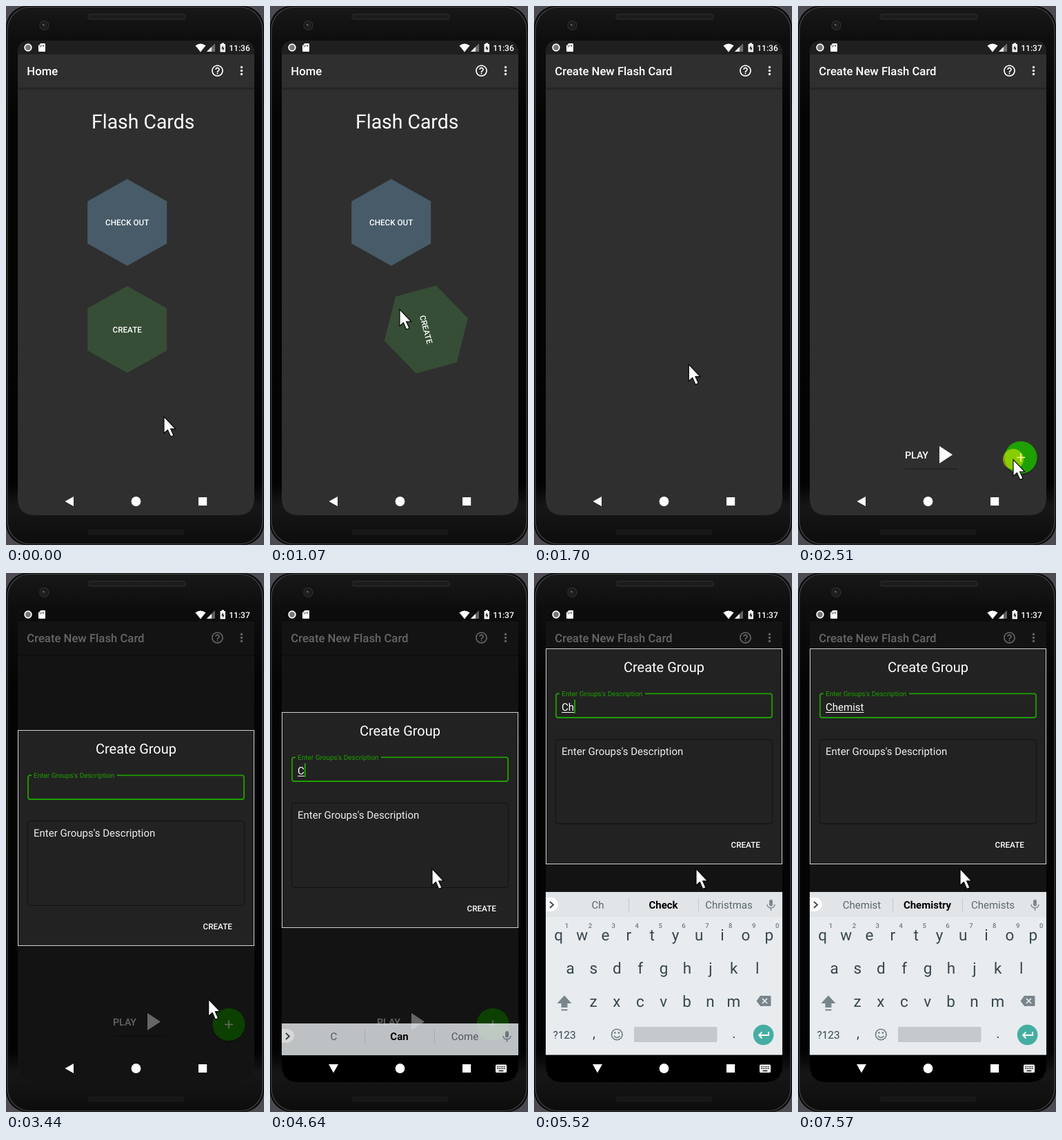
Recreate the animation shown at these times as an HTML page. Size 374x779 px, loop 8 s.

```html
<!DOCTYPE html>
<html lang="en">
<head>
<meta charset="utf-8">
<title>Flash Cards</title>
<style>
html, body { margin: 0; width: 100%; height: 100%; overflow: hidden; background: #000; }
svg { display: block; width: 100vw; height: 100vh; font-family: Roboto, sans-serif; text-rendering: geometricPrecision; }
.mid { text-anchor: middle; }
.med { font-weight: 500; }
</style>
</head>
<body>
<svg viewBox="0 0 374 779">
  <defs>
    <linearGradient id="body" x1="0" y1="0" x2="0" y2="1">
      <stop offset="0" stop-color="#181818"/><stop offset=".06" stop-color="#0e0e0e"/>
      <stop offset=".2" stop-color="#040404"/><stop offset=".89" stop-color="#030303"/>
      <stop offset=".93" stop-color="#161616"/><stop offset="1" stop-color="#0d0d0d"/>
    </linearGradient>
    <linearGradient id="shade" x1="0" y1="0" x2="0" y2="1">
      <stop offset="0" stop-opacity=".3"/><stop offset="1" stop-opacity="0"/>
    </linearGradient>
    <pattern id="mesh" width="3" height="3" patternUnits="userSpaceOnUse">
      <path d="M0 3L3 0" stroke="#2c2c2c" stroke-width=".8"/>
    </pattern>
    <clipPath id="screen"><path d="M17 68Q17 50 35 50H342Q360 50 360 68V711Q360 736 335 736H42Q17 736 17 711Z"/></clipPath>
  </defs>

  <g id="phone">
    <rect width="374" height="779" fill="#4d4a52"/>
    <rect x="0" y="0" width="374" height="779" rx="31" fill="#0a0a0a"/>
    <rect x="2" y="1.500" width="370" height="776" rx="33" fill="url(#body)" stroke="#48484a" stroke-width="1.200"/>
    <rect x="119" y="12" width="141" height="7" rx="2.500" fill="#161616" stroke="#343434"/>
    <rect x="120" y="13" width="139" height="5" fill="url(#mesh)"/>
    <rect x="119" y="757.500" width="139" height="5.500" rx="2.500" fill="#121212" stroke="#202020"/>
    <rect x="120" y="758" width="137" height="4.500" fill="url(#mesh)" opacity=".6"/>
    <circle cx="55.500" cy="28" r="6.500" fill="#1a1a1a" stroke="#2b2b2b" stroke-width="1.500"/>
    <circle cx="55.500" cy="28" r="2.800" fill="#2a2a2a"/>
    <circle cx="54" cy="27" r="1" fill="#777"/>
  </g>

  <g clip-path="url(#screen)">
    <rect x="17" y="50" width="343" height="686" fill="#2f2f2f"/>
    <rect x="17" y="50" width="343" height="20" fill="#1f1f1f"/>
    <rect x="17" y="118" width="343" height="4" fill="url(#shade)"/>
    <text id="title" class="med" x="30.300" y="99.700" font-size="16.700" fill="#fff"></text>
    <path transform="translate(296.500 83.500) scale(.8345)" fill="#fff" d="M11 18h2v-2h-2v2zm1-16C6.480 2 2 6.480 2 12s4.480 10 10 10 10-4.480 10-10S17.520 2 12 2zm0 18c-4.410 0-8-3.590-8-8s3.590-8 8-8 8 3.590 8 8-3.590 8-8 8zm0-14c-2.210 0-4 1.790-4 4h2c0-1.100.9-2 2-2s2 .9 2 2c0 2-3 1.750-3 5h2c0-2.250 3-2.500 3-5 0-2.210-1.790-4-4-4z"/>
    <g fill="#fff"><circle cx="341.500" cy="88.500" r="1.700"/><circle cx="341.500" cy="93.500" r="1.700"/><circle cx="341.500" cy="98.500" r="1.700"/></g>

    <g id="home" fill="#fff" class="mid">
      <text x="198.700" y="177" font-size="28.400">Flash Cards</text>
      <g transform="translate(175.700 312.700)">
        <path class="hex" fill="#475b69"/>
        <text class="med" y="4.300" font-size="11.700">CHECK OUT</text>
      </g>
      <g id="roller">
        <path class="hex" fill="#364e35"/>
        <text class="med" y="4.300" font-size="11.700">CREATE</text>
      </g>
    </g>

    <g id="editor" fill="#fff">
      <rect x="155" y="668" width="77" height="3" fill="url(#shade)"/>
      <text class="med" x="155" y="654" font-size="14.200">PLAY</text>
      <path d="M205 636V661L224 648.500Z"/>
      <circle cx="323" cy="654.500" r="24" fill="#000" opacity=".2"/>
      <circle id="fab" cx="323" cy="652.500" r="23.600"/>
      <path d="M317 652.500h12M323 646.500v12" stroke="#fff" stroke-width="1.700"/>
    </g>

    <rect id="dim" x="17" y="50" width="343" height="686"/>

    <g id="dialog" fill="#fff">
      <rect x="17.500" y="227.500" width="342" height="311" fill="#222" stroke="#d0d0d0"/>
      <text class="mid" x="188.500" y="261" font-size="20">Create Group</text>
      <path d="M37 292.300H35Q32 292.300 32 295.300V324Q32 327 35 327H342Q345 327 345 324V295.300Q345 292.300 342 292.300H161" fill="none" stroke="#1ea000" stroke-width="1.800"/>
      <text x="40" y="296.300" font-size="10" fill="#1ea000">Enter Groups's Description</text>
      <text id="typed" x="40" y="317" font-size="15.020"></text>
      <rect id="line" x="40" y="319" height="1"/>
      <rect id="caret" y="301" width="2" height="20" fill="#1ea000"/>
      <rect x="31.500" y="358.500" width="314" height="122" rx="4" fill="none" stroke="#111"/>
      <text x="40" y="381" font-size="15.020" fill="#eee">Enter Groups's Description</text>
      <text class="mid med" x="306.700" y="515.300" font-size="11.700">CREATE</text>
    </g>

    <rect id="navbg" x="17" y="697" width="343" height="39"/>
    <g id="keyboard">
      <rect x="17" y="461" width="343" height="235.500" fill="#e8ecef"/>
      <g id="keys"></g>
    </g>
    <g id="strip">
      <rect id="bar" x="17" y="461" width="343" fill="#e1e5e8"/>
      <path d="M17 469H25A10 10 0 0 1 25 489H17Z" fill="#fff"/>
      <path d="M23 475L28 479.500L23 484" fill="none" stroke="#37474f" stroke-width="1.800"/>
      <path d="M137.500 470V490M238.500 470V490" stroke="#c3c9cc"/>
      <g class="mid" font-size="15" fill="#5b676d">
        <text class="tip" x="92.500" y="485"></text>
        <text class="tip" x="187.500" y="485" font-weight="700" fill="#000"></text>
        <text class="tip" x="282.500" y="485"></text>
      </g>
      <rect x="341" y="472" width="5" height="9.500" rx="2.500" fill="#7b888e"/>
      <path d="M338 479Q338.500 484 343.500 484T349 479M343.500 484V488" fill="none" stroke="#7b888e" stroke-width="1.500"/>
    </g>

    <g id="status" fill="#fff">
      <circle cx="32" cy="60" r="4.800" fill="#777" stroke="#fff" stroke-width="1.800"/>
      <path d="M50.500 54H56Q57 54 57 55V65Q57 66 56 66H48Q47 66 47 65V57.500Z"/>
      <path d="M49.500 57v2.500M52 56v3M54.500 56v3" stroke="#444"/>
      <path d="M274.500 57.300Q282 51.500 289.500 57.300L282 66.500Z"/>
      <path d="M303 54V66H291Z" opacity=".35"/><path d="M298 59V66H291Z"/>
      <path d="M312.500 53.500h3.500v1.500h2V66.500h-7.500V55h2Z"/>
      <path d="M314.800 57L312 61.500H314V65L316.700 60.500H314.800Z" fill="#222"/>
      <text id="clock" class="med" x="323.300" y="64.600" font-size="12"></text>
    </g>
    <g fill="#fff">
      <path id="back"/>
      <circle cx="188.500" cy="716" r="6.900"/>
      <rect x="279" y="710" width="12.200" height="12"/>
      <g id="imeIcon">
        <rect x="327" y="710.500" width="16" height="11.500" rx="1.500"/>
        <path d="M329 713.500H341M329 716.300H341" stroke="#000" stroke-width="1.500" stroke-dasharray="1.500 1.100"/>
        <path d="M331.500 719.500H338.500" stroke="#000" stroke-width="1.500"/>
      </g>
    </g>
  </g>

  <circle id="click" r="15" fill="#ff0" opacity=".47"/>
  <path id="cursor" d="M0 .5V24.500L5.400 19.600L9.800 29.500L14 27.700L9.600 18H16.700Z" fill="#fff" stroke="#000" stroke-width="1.100"/>
</svg>
<script>
const $ = id => document.getElementById(id);
const LOOP = 8000;
const clamp = v => Math.max(0, Math.min(1, v));
const span = (t, start, dur) => clamp((t - start) / dur);
const smooth = u => u * u * (3 - 2 * u);
const easeOut = u => 1 - (1 - u) * (1 - u);
const within = (t, a, b) => t >= a && t < b;
const show = (id, on) => $(id).setAttribute('display', on ? 'inline' : 'none');
const attr = (id, name, value) => $(id).setAttribute(name, value);

// Typed text with its three suggestions
const typing = [
  [4540, 'C', 'C', 'Can', 'Come'],
  [4970, 'Ch', 'Ch', 'Check', 'Christmas'],
  [5100, 'Chm', 'Chm', 'Chem', 'CGM'],
  [5520, 'Ch', 'Ch', 'Check', 'Christmas'],
  [5770, 'Che', 'Che', 'Check', 'Cheese'],
  [5870, 'Chem', 'Chem', 'Chemical', 'Check'],
  [6580, 'Chemi', 'Chemi', 'Chemical', 'Check'],
  [6780, 'Chemis', 'Chemis', 'Chemistry', 'Chemist'],
  [7110, 'Chemist', 'Chemist', 'Chemistry', 'Chemists']
];

// Pointer moves: start, duration, then four Bezier points
const moves = [
  [150, 270, [229, 593], [268, 560], [225, 460], [188, 438]],
  [1480, 600, [188, 438], [219, 532], [285, 600], [312, 655]],
  [3360, 280, [312, 655], [279, 598], [262, 500], [235, 427]]
];

function bezier(p, u) {
  const v = 1 - u;
  return [0, 1].map(i => v * v * v * p[0][i] + 3 * v * v * u * p[1][i] + 3 * v * u * u * p[2][i] + u * u * u * p[3][i]);
}

function pointer(t) {
  const move = moves.filter(m => t >= m[0]).pop() || moves[0];
  return bezier(move.slice(2), smooth(span(t, move[0], move[1])));
}

function buildKeys() {
  const label = (s, x, y, size, extra = '') =>
    `<text class="mid" x="${x}" y="${y}" font-size="${size}" ${extra}>${s}</text>`;
  const row = (letters, x, y) => [...letters].map((c, i) => label(c, x + i * 33.9, y, 22.500)).join('');
  const digits = [...'1234567890'].map((c, i) =>
    label(c, 47.500 + i * 33.9, 513, 9.500, 'font-weight="500" fill="#6e7b81"')).join('');
  $('keys').innerHTML = `<g fill="#37474f">
    ${row('qwertyuiop', 35.700, 531)}${row('asdfghjkl', 52.500, 579)}${row('zxcvbnm', 86, 627)}${digits}
    ${label('?123', 44, 672.500, 15.400)}${label(',', 87, 672, 20)}${label('.', 290, 672, 20)}</g>
    <path d="M44 610.500L54.500 622H48.500V628H39.500V622H33.500Z M39.500 630.500h9v2h-9Z" fill="#78868c"/>
    <path d="M328 611H342Q343.500 611 343.500 612.500V624.500Q343.500 626 342 626H328L322.500 618.500Z" fill="#78868c"/>
    <path d="M331 615l7 7m0-7l-7 7" stroke="#e8ecef" stroke-width="1.700"/>
    <g fill="none" stroke="#6e7b81" stroke-width="1.600"><circle cx="120.200" cy="667" r="7.800"/>
    <path d="M115.800 669Q120.200 674 124.600 669"/></g>
    <path d="M116.300 664.500h2.300M121.800 664.500h2.300" stroke="#6e7b81" stroke-width="2.300"/>
    <rect x="145" y="656" width="120.500" height="22" rx="2" fill="#c3c9cc"/>
    <circle cx="332.600" cy="667.500" r="14.800" fill="#45aea2"/>
    <path d="M340 663v5H326m4.500-4.500l-4.500 4.500l4.500 4.500" fill="none" stroke="#fff" stroke-width="1.800"/>`;
}

function setText(node, s) {
  if (node.textContent !== s) node.textContent = s;
}

function drawTyping(t) {
  const now = typing.filter(s => t >= s[0]).pop();
  const word = now ? now[1] : '';
  setText($('typed'), word);
  document.querySelectorAll('.tip').forEach((node, i) => setText(node, now ? now[i + 2] : ''));
  const width = word ? $('typed').getComputedTextLength() : 0;
  attr('line', 'width', width);
  attr('caret', 'x', 40 + width);
  show('caret', within(t, 3920, 6330) || within(t, 6580, 7570));
}

function drawKeyboard(t) {
  const ime = t >= 4540, full = t >= 4970;
  const p = easeOut(span(t, 5055, 220));
  const slide = (1 - p) * 73;
  show('navbg', ime);
  show('imeIcon', ime);
  attr('back', 'd', ime ? 'M85 710H99L92 722.500Z' : 'M85.500 716L98 709V723Z');
  show('keyboard', full);
  attr('keyboard', 'opacity', p);
  attr('keyboard', 'transform', `translate(0 ${slide})`);
  show('strip', ime);
  attr('strip', 'opacity', full ? p : span(t, 4500, 170));
  attr('strip', 'transform', `translate(0 ${full ? slide : 190})`);
  attr('bar', 'height', full ? 36 : 46);
}

function render(t) {
  const home = t < 1670;
  setText($('title'), home ? 'Home' : 'Create New Flash Card');
  setText($('clock'), t < 2000 ? '11:36' : '11:37');

  show('home', home);
  const roll = Math.max(0, t - 860) / 1000;
  attr('roller', 'transform', `translate(${175.700 + 240 * roll} 467.500) rotate(${355 * roll})`);

  const enter = easeOut(span(t, 1720, 300));
  show('editor', !home);
  attr('editor', 'opacity', enter);
  attr('editor', 'transform', `translate(0 ${(1 - enter) * 14})`);
  attr('fab', 'fill', within(t, 2890, 3040) ? '#35ad1a' : '#1ea000');

  const open = easeOut(span(t, 3020, 220));
  const scale = .9 + .1 * open;
  const shift = t < 4540 ? 0 : t < 4970 ? -26 : -118;
  attr('dim', 'opacity', open * .6);
  show('dialog', open > 0);
  attr('dialog', 'opacity', open);
  attr('dialog', 'transform', `translate(188.500 ${383 + shift}) scale(${scale}) translate(-188.500 -383)`);

  drawTyping(t);
  drawKeyboard(t);

  const at = `translate(${pointer(t)})`;
  attr('cursor', 'transform', at);
  attr('click', 'transform', at);
  show('click', within(t, 620, 700) || within(t, 2510, 2590));
}

document.querySelectorAll('.hex').forEach(h =>
  h.setAttribute('d', 'M0 -62.700L57.500 -30.500V30.500L0 62.700L-57.500 30.500V-30.500Z'));
buildKeys();
const start = performance.now();
function tick() {
  render((performance.now() - start) % LOOP);
  requestAnimationFrame(tick);
}
tick();
</script>
</body>
</html>
```
